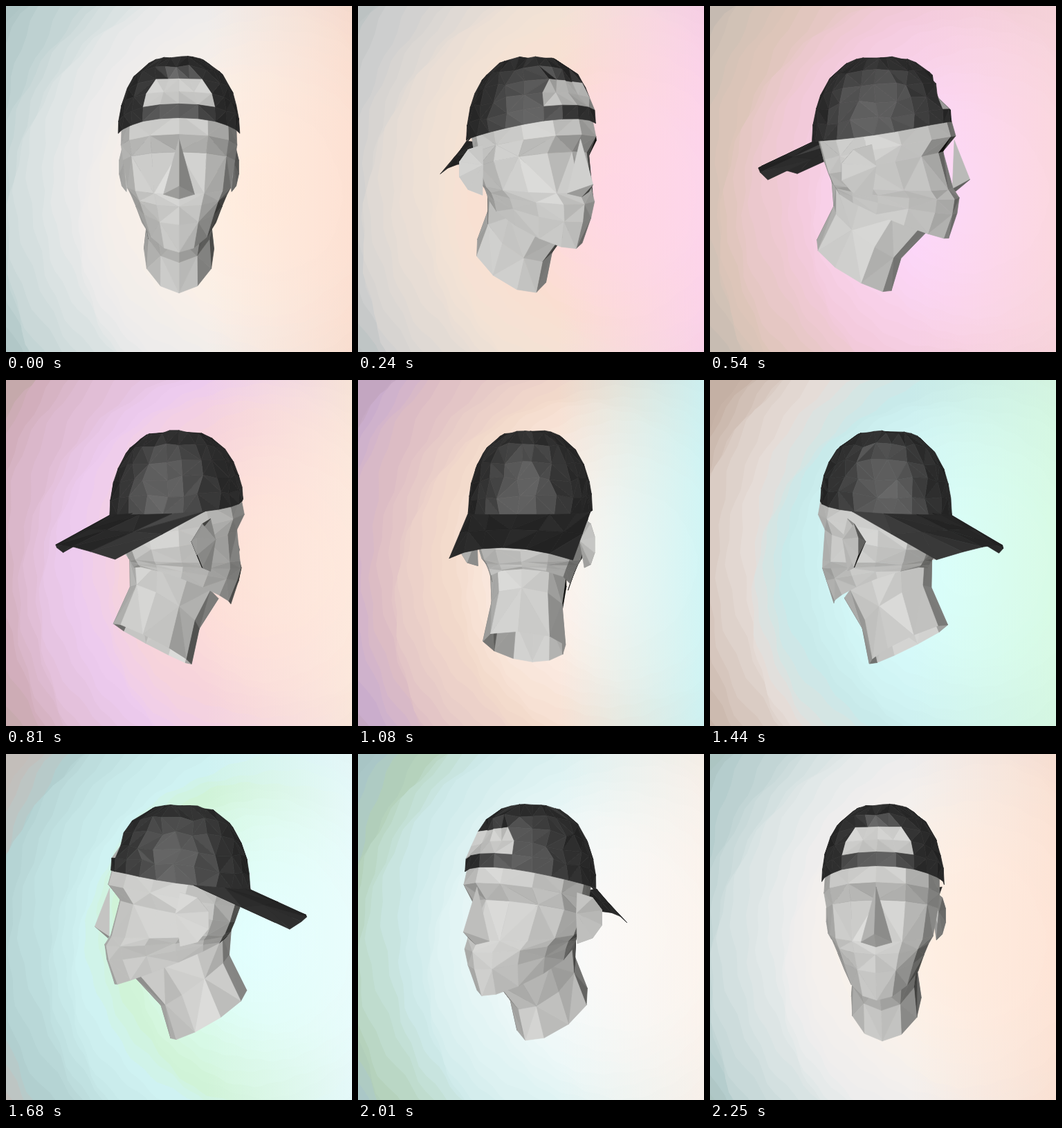
Recreate the animation shown at these times as an HTML page with a canvas. Size 500x500 px, loop 2280 ms.

```html
<!DOCTYPE html>
<html>
<head>
<meta charset="utf-8">
<style>
html, body { margin: 0; width: 100%; height: 100%; overflow: hidden; }
canvas { display: block; width: 500px; height: 500px; }
</style>
</head>
<body>
<canvas id="stage" width="500" height="500"></canvas>
<script>
const ctx = document.getElementById('stage').getContext('2d');
const LOOP = 2280, STEP = 30, TAU = Math.PI * 2;
const CAMERA = 650, HORIZON = 205;

let seed = 11;
const rand = () => (seed = seed * 16807 % 2147483647) / 2147483647;
const jitter = amount => (rand() * 2 - 1) * amount;
const lerp = (a, b, k) => a + (b - a) * k;
const mix = (a, b, k) => a.map((v, i) => lerp(v, b[i], k));
const range = (n, make) => Array.from({ length: n }, (_, i) => make(i));
const rgb = c => `rgb(${c.map(Math.round)})`;

// ---- Sky: one cycle of colours; the left lags behind, the right runs ahead
const CYCLE = Object.entries({
  0: 'ffeee0', 120: 'fee2d4', 290: 'ffd4e4', 540: 'fcd8ff', 660: 'fcd8e0', 850: 'fee4d4', 1080: 'fff5f0',
  1200: 'd2f6f6', 1440: 'daffff', 1510: 'd6fadc', 1680: 'e0ffff', 2010: 'fafafa', 2280: 'ffeee0'
}).map(([time, hex]) => [+time, [0, 2, 4].map(i => parseInt(hex.substr(i, 2), 16))]);

function skyColour(time, dim) {
  const t = (time + LOOP) % LOOP;
  const i = CYCLE.findIndex(key => key[0] > t);
  const [t0, c0] = CYCLE[i - 1], [t1, c1] = CYCLE[i];
  return rgb(mix(c0, c1, (t - t0) / (t1 - t0)).map(v => v * dim));
}

function drawSky(t) {
  const spin = t / LOOP * TAU;
  for (let r = 504; r > 0; r -= 14) {
    const reach = Math.min(r / 400, 1.1);
    const fade = 0.17 * reach ** 3;
    const tone = ctx.createLinearGradient(290, 0, 500, 0);
    tone.addColorStop(0, skyColour(t - 500 * reach ** 1.8, 1 - fade));
    tone.addColorStop(1, skyColour(t + 120, 1 - fade / 2));
    ctx.fillStyle = tone;
    ctx.beginPath();
    for (let a = 0; a < TAU; a += 0.05) {
      const wobble = 0.025 * Math.sin(3 * a + r * 0.05 + spin)
        + 0.014 * Math.sin(8 * a + r * 0.13) + 0.008 * Math.sin(31 * a + r);
      const d = r * (1 + wobble);
      ctx.lineTo(375 + d * Math.cos(a), 270 + d * 1.05 * Math.sin(a));
    }
    ctx.fill();
  }
}

// ---- Model: points are [x right, y down, z forward]
function mesh(rows, closed, paint, diagonal) {
  const faces = [], n = rows[0].length;
  for (let r = 0; r < rows.length - 1; r++) {
    for (let k = 0; k < (closed ? n : n - 1); k++) {
      const next = (k + 1) % n;
      const a = rows[r][k], b = rows[r][next], c = rows[r + 1][next], d = rows[r + 1][k];
      const pair = diagonal(r, k, n) ? [[a, b, d], [b, c, d]] : [[a, b, c], [a, c, d]];
      for (const points of pair) faces.push({ points, paint: paint(r, k), tone: jitter(1) });
    }
  }
  return faces;
}
const skin = () => 'skin', cloth = () => 'cloth';
const skinFace = points => ({ points, paint: 'skin', tone: jitter(1) });
const symmetric = (r, k, n) => k < n / 2 ? (r + k) % 2 : 1 - (r + n - 1 - k) % 2;
const anyWay = () => rand() < 0.5;

// A tilted oval, narrowed towards the front by taper
const oval = (count, frontY, backY, width, frontZ, backZ, taper) => range(count, k => {
  const a = k / count * TAU, back = (1 - Math.cos(a)) / 2;
  return [width * Math.sin(a) * (1 - taper * (1 - back)), lerp(frontY, backY, back), lerp(frontZ, backZ, back)];
});

const bridge = [0, 194, 102], tip = [0, 250, 124], base = [0, 267, 104];
const nose = [1, -1].flatMap(side => {
  const wing = [19 * side, 262, 98];
  return [[bridge, wing, tip], [tip, wing, base]]
    .map(([a, b, c]) => skinFace(side > 0 ? [a, b, c] : [a, c, b]));
});
const head = [...mesh([
  oval(14, 163, 193, 82, 97, -95, 0),
  oval(14, 188, 222, 82, 104, -87, 0),
  oval(14, 210, 242, 80, 86, -80, 0),
  oval(14, 262, 256, 75, 100, -74, 0.05),
  oval(14, 276, 260, 73, 109, -71, 0.15),
  oval(14, 298, 263, 71, 106, -69, 0.25),
  oval(14, 334, 266, 69, 94, -66, 0.4)
], true, skin, symmetric), ...nose];

const neck = mesh([
  oval(10, 324, 252, 60, 64, -75, 0.2),
  oval(10, 364, 290, 56, 26, -72, 0.25),
  oval(10, 411, 340, 66, 12, -97, 0.35)
], true, skin, symmetric);

const ears = [1, -1].map(side => {
  const rim = range(6, i => {
    const a = i / 5 * Math.PI;
    return [side * (77 + 16 * Math.sin(a)), 235 - 34 * Math.cos(a), -8 - 38 * Math.sin(a)];
  });
  const hubs = [[side * 80, 228, -2], [side * 72, 230, -36]];
  return { side, faces: hubs.flatMap(hub => range(5, i => skinFace([hub, rim[i], rim[i + 1]]))) };
});

function capPoint(angle, height, size = 1) {
  const c = Math.cos(angle), r = size * Math.max(0, 1 - height * height) ** 0.37;
  const rimY = 189 - 14 * c - 7 * c * c;
  return [88 * r * Math.sin(angle), lerp(rimY, 75, height), -4 + 98 * r * c];
}

const COLUMNS = 24;
const capRows = range(7, i => range(COLUMNS, k => {
  const offset = k > COLUMNS / 2 ? k - COLUMNS : k, aside = Math.abs(offset);
  let angle = offset / COLUMNS * TAU, height = Math.min(1, (6 - i) * 0.185), size = 1;
  if (i > 0 && i < 6 && (i < 3 || aside > 3)) {
    angle += jitter(0.07);
    height += jitter(0.03);
  }
  if (i === 3 && aside <= 2) angle *= 0.75;
  if ((i === 3 || i === 4) && aside < 2) size = 0.9;
  if (i > 4 && aside <= 2) size = 1.04;
  return capPoint(angle, height, size);
}));
const inOpening = (r, k) => (r === 3 || r === 4) && (k < 2 || k >= COLUMNS - 2);
const cap = mesh(capRows, true, (r, k) => inOpening(r, k) ? 'skin' : 'cloth', anyWay);

const brim = mesh(range(3, row => range(7, col => {
  const u = 1 - col / 3;
  const edge = [71 * u, 232 + 15 * u * u, -180 + 34 * u * u];
  return mix(capPoint(Math.PI - 1.35 * u, 0), edge, row / 2);
})), false, cloth, anyWay);

// ---- Shading and drawing
const LIGHT = [-0.25, -0.2, 0.947], GLOSS = [-0.1, -0.12, 0.988];
const sub = (a, b) => a.map((v, i) => v - b[i]);
const dot = (a, b) => a[0] * b[0] + a[1] * b[1] + a[2] * b[2];
const cross = (a, b) => [a[1] * b[2] - a[2] * b[1], a[2] * b[0] - a[0] * b[2], a[0] * b[1] - a[1] * b[0]];

function shade({ paint, tone }, normal) {
  if (paint === 'cloth') {
    const v = 38 + 62 * Math.max(0, dot(normal, GLOSS)) ** 6 + 6 * tone;
    return [v, v, v];
  }
  const lit = dot(normal, LIGHT);
  const v = lit < -0.1 ? 14 : 66 + 146 * Math.max(0, lit) ** 0.6 + 10 * tone;
  return [v, v, v - 2];
}

function drawFaces(faces, theta, twoSided) {
  const c = Math.cos(theta), s = Math.sin(theta), visible = [];
  for (const face of faces) {
    const view = face.points.map(([x, y, z]) => [x * c + z * s, y - HORIZON, z * c - x * s]);
    const flat = view.map(([x, y, d]) => {
      const scale = CAMERA / (CAMERA - d);
      return [250 + x * scale, HORIZON + y * scale];
    });
    const [p, q, r] = flat;
    const area = (q[0] - p[0]) * (r[1] - p[1]) - (q[1] - p[1]) * (r[0] - p[0]);
    if (Math.abs(area) < 0.01 || (area < 0 && !twoSided)) continue;
    const n = cross(sub(view[1], view[0]), sub(view[2], view[0]));
    const length = Math.hypot(...n) * Math.sign(area);
    visible.push({
      flat,
      depth: view[0][2] + view[1][2] + view[2][2],
      colour: rgb(shade(face, n.map(v => v / length)))
    });
  }
  visible.sort((a, b) => a.depth - b.depth);
  for (const { flat, colour } of visible) {
    ctx.beginPath();
    flat.forEach(p => ctx.lineTo(p[0], p[1]));
    ctx.closePath();
    ctx.fillStyle = ctx.strokeStyle = colour;
    ctx.fill();
    ctx.stroke();
  }
}

function drawModel(theta) {
  const c = Math.cos(theta), s = Math.sin(theta);
  const isNear = ear => -25 * c - 88 * ear.side * s > 0;
  const drawEars = near => ears.filter(ear => isNear(ear) === near)
    .forEach(ear => drawFaces(ear.faces, theta, true));
  if (c > 0) drawFaces(brim, theta, true);
  drawFaces(neck, theta, true);
  drawEars(false);
  drawFaces(head, theta, false);
  drawEars(true);
  drawFaces(cap, theta, false);
  if (c <= 0) drawFaces(brim, theta, true);
}

ctx.lineWidth = 0.7;
ctx.lineJoin = 'round';
function frame() {
  const t = Math.floor(performance.now() % LOOP / STEP) * STEP;
  drawSky(t);
  drawModel(t / LOOP * TAU);
  requestAnimationFrame(frame);
}
frame();
</script>
</body>
</html>
```
